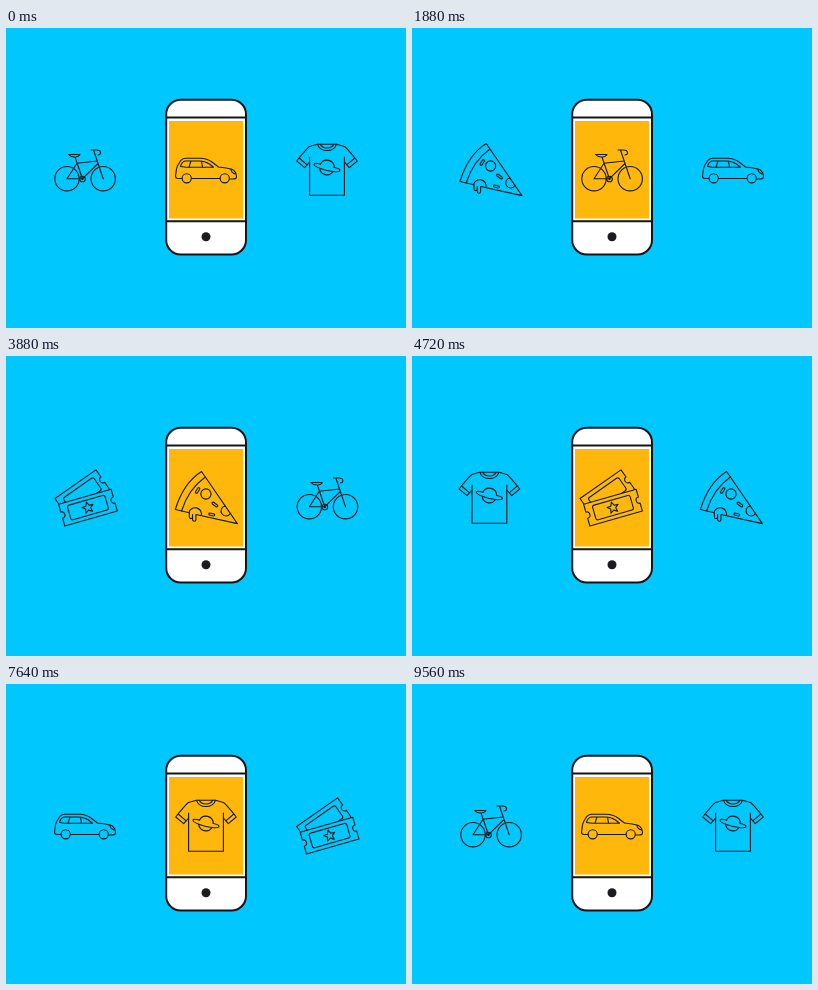
Recreate the animation shown at these times as an HTML page. Size 400x300 px, loop 9600 ms.

```html
<!DOCTYPE html>
<html lang="en">
<head>
<meta charset="utf-8">
<title>Phone carousel</title>
<style>
  html, body { margin: 0; width: 100%; height: 100%; overflow: hidden; background: #00c8ff; }
  svg { display: block; width: 400px; height: 300px; }
  #row { fill: none; stroke: #141a1e; stroke-width: 1.1; stroke-linejoin: round; stroke-linecap: round; }
</style>
</head>
<body>
<svg viewBox="0 0 400 300">
  <defs>
    <path id="ticket" d="M-27.3-11.3H27.3V-3.2a3.2 3.2 0 0 0 0 6.4V11.3H-27.3V3.2a3.2 3.2 0 0 0 0-6.4Z"/>
    <mask id="behind" maskUnits="userSpaceOnUse" x="-40" y="-40" width="80" height="80">
      <path d="M-40-40H40V40H-40Z" fill="#fff" stroke="none"/>
      <use href="#ticket" transform="translate(2.6 9.6) rotate(-16)" fill="#000" stroke="none"/>
    </mask>
  </defs>

  <!-- phone -->
  <g stroke="#16161a" stroke-width="2">
    <rect x="160.2" y="71.7" width="79.8" height="154.8" rx="14.5" fill="#fff"/>
    <path d="M160 89.4H240M160 193.3H240"/>
  </g>
  <rect x="163" y="93" width="74.2" height="97.5" fill="#ffb70c"/>
  <circle cx="200" cy="208.7" r="4.5" fill="#1c1c20"/>

  <!-- icons, each centred on its own origin -->
  <g id="row">
    <g><!-- car -->
      <path d="M-24 8.5H-28Q-30.5 8.5-30.5 6L-29.5-1Q-29-4-26.5-7.5Q-24.5-11.7-20-11.7H-6Q1-11.7 6-8L12.5-3Q21-2.3 26.5-.5Q30.5 2 30.5 7Q30.5 9 27 9H23.5M-14.5 8.5H14"/>
      <path d="M-25.5-3.5Q-24-9-20-9H-7Q-1-9 3.5-6L7.5-2.8L-20-2.8ZM-15-9L-17-2.8M-4.5-9L-3.5-2.8M25-1Q25 3 29.5 4"/>
      <circle cx="-19.3" cy="8.3" r="4.6"/>
      <circle cx="18.7" cy="8.3" r="4.6"/>
    </g>
    <g><!-- bicycle -->
      <circle cx="-18" cy="8.7" r="12.2"/>
      <circle cx="18.2" cy="8.7" r="12.2"/>
      <circle cx="-2.5" cy="9" r="2.8"/>
      <circle cx="-2.5" cy="9" r=".6"/>
      <path d="M-18 8.7H-2.5L13-6.5M-18 8.7L-8-6.8L12.3-9M-2.5 9L-10-13M-16.5-15.5H-5Q-6-13.5-9-13Q-14-12.5-16.5-15.5ZM18.2 8.7L9.5-17L8.5-20M6-20H11.5Q15.5-20 15.5-17.2Q15.5-15 13-15"/>
    </g>
    <g><!-- pizza -->
      <path d="M-4.8-26.5Q-23-15-31 11.5L-17 14.8V19a1.6 1.6 0 0 0 3.2 0V16.5V21.5a1.7 1.7 0 0 0 3.4 0V16.5L31 25.6Z"/>
      <path d="M-1-21Q-18-9-24.8 13"/>
      <circle cx="-.4" cy="-4" r="5.1"/>
      <path d="M-17.5 14.7A6.4 6.4 0 1 1-5 17.5"/>
      <path d="M19.1 8A5 5 0 1 0 24.1 15.3"/>
      <path d="M-11-6l2.5-4q1.5-1 2 1l-2.5 4q-1.5 1-2-1ZM3 15l5 1q1 2-1 2l-4-1q-1-1 0-2ZM7 4l4 3q1 2-1 2l-4-3q-1-2 1-2Z"/>
    </g>
    <g><!-- tickets -->
      <g mask="url(#behind)">
        <g transform="translate(-3 -4) rotate(-35)">
          <path d="M-25-12H25V-3.2a3.2 3.2 0 0 0 0 6.4V12H-25V3.2a3.2 3.2 0 0 0 0-6.4Z"/>
          <rect x="-18.5" y="-7.6" width="37" height="15.2" rx="2"/>
        </g>
      </g>
      <g transform="translate(2.6 9.6) rotate(-16)">
        <use href="#ticket"/>
        <rect x="-19.5" y="-7.6" width="39" height="15.2" rx="2"/>
        <path d="M0-5.8L1.7-2L5.7-1.7L2.6.8L3.5 4.8L0 2.6L-3.5 4.8L-2.6.8L-5.7-1.7L-1.7-2Z"/>
      </g>
    </g>
    <g><!-- shirt -->
      <path d="M-9.5-25.7L-17.5-23.5Q-20-22-30.3-9L-22.3-2.3L-17.4-8V25.2H17.4V-8L22.3-2.3L30.3-9Q20-22 17.5-23.5L9.5-25.7Z"/>
      <path d="M-9.5-25.7Q-7.5-19.5 0-19.5T9.5-25.7M-6.8-25.7Q-5-22 0-22T6.8-25.7M-27.8-12L-19.8-5.2M27.8-12L19.8-5.2M-17.4-8V-13M17.4-8V-13"/>
      <g transform="translate(0 -2.7) rotate(14)">
        <path d="M-7.1-1.5A7.3 7.3 0 0 1 7.1-1.5M-6.9 2.6A7.3 7.3 0 0 0 6.9 2.6"/>
        <path d="M-7.1-1.5C-15-2-16 1.6-6.9 2.6Q0 3.5 6.9 2.6C16 1.6 15-2 7.1-1.5"/>
      </g>
    </g>
  </g>

  <path id="check" d="M175.5 146.5L188.5 159.5L224.5 123.5" pathLength="1" fill="none" stroke="#fff"
    stroke-width="7" stroke-linecap="round" stroke-linejoin="round"/>
</svg>
<script>
  const GAP = 121, STEP = 1920, TICK = 40;
  const icons = [...document.getElementById('row').children];
  const check = document.getElementById('check');
  const span = GAP * icons.length;
  const clamp = v => Math.max(0, Math.min(1, v));
  const smooth = s => s * s * (3 - 2 * s);

  // cubic-bezier(.46, 0, .57, 1), solved by bisection
  function ease(x) {
    let lo = 0, hi = 1;
    for (let i = 0; i < 20; i++) {
      const s = (lo + hi) / 2, r = 1 - s;
      if (3 * s * r * (.46 * r + .57 * s) + s ** 3 < x) lo = s; else hi = s;
    }
    return smooth(hi);
  }

  function draw(now) {
    const t = Math.floor(now / TICK) * TICK % (STEP * icons.length);
    const u = t % STEP;
    const shift = Math.floor(t / STEP) + ease(clamp(u / 960));
    icons.forEach((icon, i) => {
      const x = 200 + GAP * (shift - i);
      const wrapped = ((x + 100) % span + span) % span - 100;
      icon.setAttribute('transform', `translate(${wrapped.toFixed(2)} 142)`);
    });
    // the tick draws itself, holds, then vanishes just before the next slide
    check.style.display = u >= 1160 && u < 1880 ? '' : 'none';
    check.style.strokeDasharray = `${smooth(clamp((u - 1120) / 320))} 2`;
  }

  const start = performance.now();
  function loop() {
    draw(performance.now() - start);
    requestAnimationFrame(loop);
  }
  loop();
</script>
</body>
</html>
```
